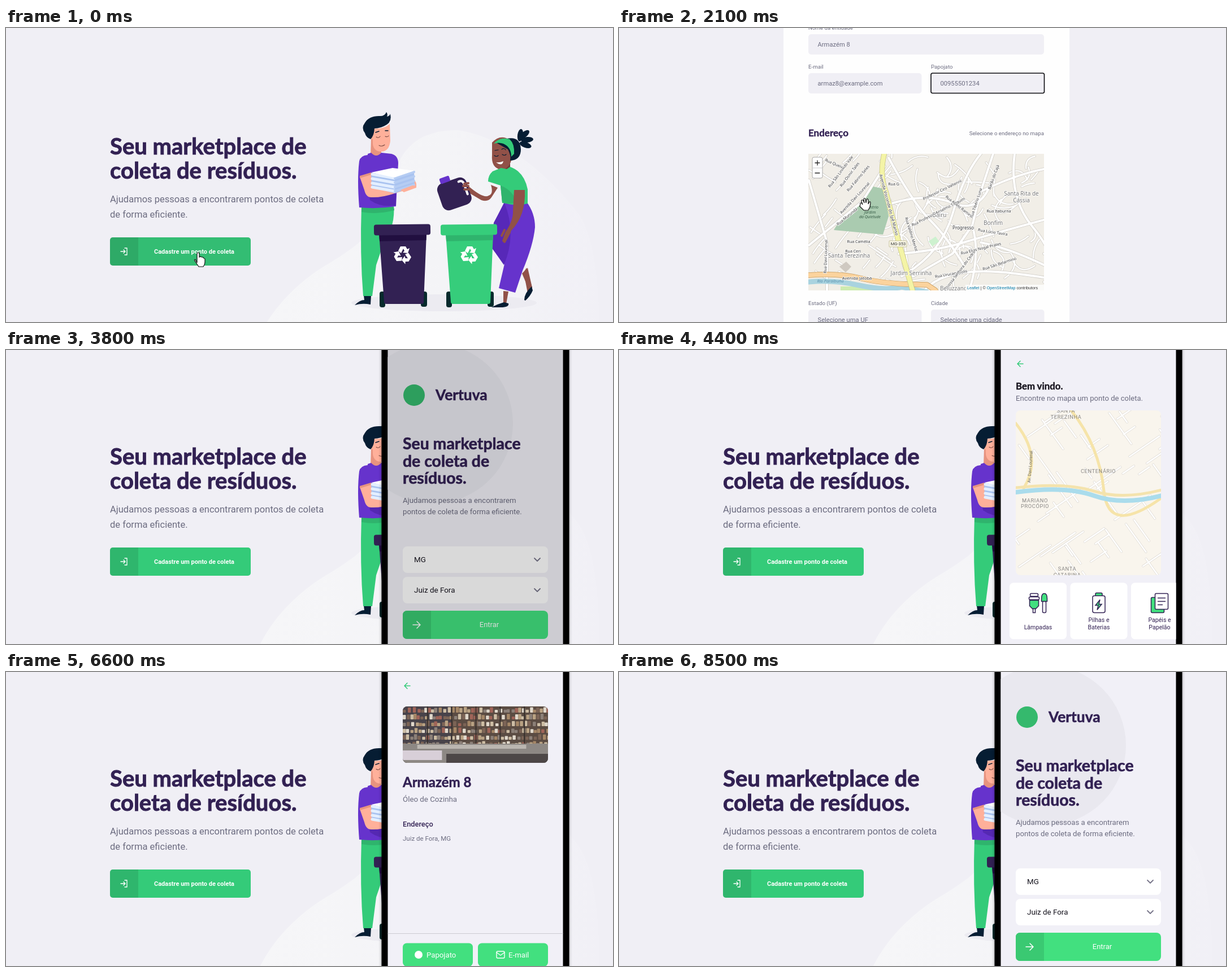
An HTML page that plays this animation: 1074x521 px, repeating every 8.6 s.

```html
<!DOCTYPE html>
<html lang="pt-BR">
<head>
<meta charset="utf-8">
<title>Coleta de resíduos</title>
<style>
  html, body { margin: 0; width: 100%; height: 100%; overflow: hidden; background: #f0eff5; }
  svg { display: block; }
  text { font-family: Roboto, sans-serif; white-space: pre; }
  .title { font-family: Lato, sans-serif; font-weight: 700; stroke-width: .022em; }
  .place { font-family: "Noto Sans", sans-serif; }
  .credit { font-family: "Liberation Sans", sans-serif; }
  #phone { filter: drop-shadow(0 0 2.5px rgba(0, 0, 0, .4)); }
</style>
</head>
<body>
<svg id="stage" width="1074" height="521" viewBox="0 0 1074 521"></svg>
<script>
const INK = '#322153', GRAY = '#6c6c80', GREEN = '#34cb79', MINT = '#42e07f', PURPLE = '#6633cc';
const NAVY = '#061d33', SKIN = '#ffb09a', BROWN = '#915148', PAGE = '#f0eff5';

let clipCount = 0;
const text = (x, y, size, s, fill = GRAY, attrs = '') =>
  `<text x="${x}" y="${y}" font-size="${size}" fill="${fill}" ${attrs}>${s}</text>`;
const title = (x, y, size, s, fill = INK) => text(x, y, size, s, fill, `class="title" stroke="${fill}"`);
const mid = 'text-anchor="middle"';
const inked = `stroke="${INK}" stroke-width="1.5"`;
const rect = (x, y, w, h, r, fill, attrs = '') =>
  `<rect x="${x}" y="${y}" width="${w}" height="${h}" rx="${r}" fill="${fill}" ${attrs}/>`;
const path = (d, fill, attrs = '') => `<path d="${d}" fill="${fill}" ${attrs}/>`;
const line = (d, stroke, w = 1, attrs = '') =>
  `<path d="${d}" fill="none" stroke="${stroke}" stroke-width="${w}" stroke-linecap="round" stroke-linejoin="round" ${attrs}/>`;
const circle = (x, y, r, fill) => `<circle cx="${x}" cy="${y}" r="${r}" fill="${fill}"/>`;
const group = (id, body) => `<g id="${id}">${body}</g>`;
const at = (x, y, body, extra = '') => `<g transform="translate(${x} ${y}) ${extra}">${body}</g>`;
const clip = (x, y, w, h, r, body) => {
  const id = 'clip' + ++clipCount;
  return `<clipPath id="${id}">${rect(x, y, w, h, r, '#000')}</clipPath><g clip-path="url(#${id})">${body}</g>`;
};
const random = seed => () => (seed = (seed * 16807) % 2147483647) / 2147483647;

// Pictures in flat tones
function shelves(x, y, w, h, r, seed) {
  const next = random(seed), unit = h / 100;
  const tones = ['#a58767', '#cdbda4', '#7c6456', '#e0d8cb', '#8c8078', '#a06458', '#b9a283'];
  let body = rect(x, y, w, h, 0, '#5b4c43') + rect(x, y, w * .34, h, 0, '#48434a');
  for (let row = 0; row < 6; row++)
    for (let px = 0; px < w; px += (5 + next() * 4) * unit) {
      const tall = (5 + next() * 5) * unit;
      body += rect(x + px, y + (row * 12 + 11) * unit - tall, 5.5 * unit, tall, unit, tones[next() * tones.length | 0]);
    }
  for (let i = 1; i < 6; i++) body += rect(x + w * i / 6, y, 2 * unit, h * .68, 0, '#37302d');
  body += rect(x, y + h * .66, w, h * .34, 0, '#8d8884') + rect(x + w * .1, y + h * .68, w * .75, h * .07, 0, '#bbb6b0')
    + rect(x, y + h * .78, w * .27, h * .17, 0, '#d8cfd8') + rect(x + w * .3, y + h * .84, w * .7, h * .16, 0, '#4d4747');
  return clip(x, y, w, h, r, body);
}
const aisle = (x, y, w, h, tone) => clip(x, y, w, h, 0, rect(x, y, w, h, 0, '#35302f')
  + path(`M${x} ${y + h}L${x + w * .45} ${y + h * .5}h${w * .12}L${x + w} ${y + h}Z`, '#9b9a9a')
  + path(`M${x + w} ${y}v${h * .9}L${x + w * .57} ${y + h * .5}ZM${x} ${y}v${h * .9}L${x + w * .45} ${y + h * .5}Z`, tone)
  + line(`M${x + w * .25} ${y}L${x + w * .47} ${y + h * .42}M${x + w * .75} ${y}L${x + w * .55} ${y + h * .42}`, '#e6e2da', 1.5));

const hand = (x, y) => at(x, y, path('M-3 9V-7q0-2 2-2t2 2v6l2-1 2 1 2 0 2 2q2 0 2 2v5q0 4-3 8H0L-6 7q-3-4 0-4Z', '#fff', 'stroke="#111" stroke-width="1.2"'));
const arrow = (x, y) => at(x, y, path('M0 0V16L4 12.5 7 19 10 17.5 7 11.5H12Z', '#fff', 'stroke="#222"'));
const grab = (x, y) => at(x, y, path('M-8 1q-1-4 2-3l2 3-2-6q0-3 3-2l2 5-1-7q1-3 3 0l1 7 1-6q2-3 3 1v7l2-4q2-1 2 2l-1 7-3 6h-8L-9 4Z', '#fff', 'stroke="#111" stroke-width="1.2"'));

// Landing page
const recycle = (x, y) => at(x, y, [0, 120, 240].map(a =>
  path('M-8-7L-4-15H5L8-10 12-12 9-3 0-4 3-7 1-11-3-3Z', '#fff', `transform="rotate(${a})"`)).join(''));
const bin = (x, body, shade) => at(x, 0,
  rect(10, 467, 10, 28, 4, '#062a2c') + rect(83, 467, 11, 27, 4, '#062a2c')
  + path('M9 364L93 363 88 486q0 3-4 3H22q-4 0-4-4Z', body) + path('M9 364H93L92.5 376 10 378Z', shade)
  + rect(0, 348, 100, 19, 4, body, 'transform="rotate(-.7 50 357)"') + recycle(51, 402));

const man = path('M633 474h13l-1 16q-14-3-28 1 9-9 17-9Z', NAVY)
  + path('M629 314H686Q689 350 670 376L655 420 648 475H632Q626 400 629 314Z', GREEN)
  + path('M629 317h57l1 6q-30 8-58 3Z', '#2fb46d')
  + path('M646 196h18v30q-9 7-19 0Z', '#e7937f')
  + path('M640 223l6-2q9 10 18 0l18 2q12 3 12 17l-4 76q-33 5-65 2-4-50 0-82 2-10 15-11Z', PURPLE)
  + path('M640 280h50v34q-26 5-46-9Z', '#5528b2')
  + path('M648 178q20 2 31-8l1 30q-2 19-16 19-13 0-15-13Z', SKIN) + circle(649, 193, 4, SKIN)
  + path('M645 197q-8-3-10-11-7-9 0-18 7-12 25-12 10 1 13-7 3 4 1 8 5-1 6-5 3 13-6 19-11 7-22 7-1 10-3 13-1 3-4 6Z', NAVY)
  + line('M655 193q4 3 7-1m9 0q4 2 6-1M660 208q5 3 10-1', '#76463f', 1.1) + line('M654 185l6-2m11-1 5 0', NAVY, 1.5)
  + path('M626 264l20-6 5 26 40 1 32-15q4 4 3 12l-38 11q-24 8-42 7-9 0-12-13Z', SKIN)
  + path('M626 262l20-6v4l-20 6Z', '#e7937f')
  + path('M646 257L687 264 722 254 723 280 688 293 647 282Z', '#a9c3f0')
  + [0, 8, 16, 23].map(y => line(`M648 ${259 + y}l39 7`, '#e4efff', 5) + line(`M688 ${266 + y}l34-11`, '#b6cdf3', 4)).join('')
  + path('M646 256l38-8 38 5-35 12Z', '#fff') + path('M698 287l21-8q8 0 7 4l-22 8Z', SKIN);

const petals = [[917, 189, 50], [922, 198, 85], [910, 190, 8], [919, 207, 110]].map(([x, y, a]) =>
  `<ellipse cx="${x}" cy="${y}" rx="5" ry="11" fill="${NAVY}" transform="rotate(${a} ${x} ${y})"/>`).join('');
const woman = petals
  + path('M889 467l-4 22-5 1 0-24ZM921 425l10 35-7 15-8-42Z', BROWN) + path('M913 435l10-10 8 35-6 3Z', BROWN)
  + path('M881 486l8 2q2 7-14 7h-16q11-6 22-9ZM917 482q0-12 13-24l2 7q-4 10-13 18Z', NAVY)
  + path('M882 308h39q15 20 15 45-3 32-22 77L901 469 872 461 882 418 858 388 863 346Z', PURPLE)
  + path('M882 310q22 55-1 110l-21-30 3-45Z', '#5728b8')
  + path('M858 278q5 16-4 19-9 6-36-17-7-4-10 1l1 7 10 4 22 13q12 4 18-5l11-17Z', BROWN)
  + path('M871 240h21v14q-12 6-21-4Z', '#733d38')
  + path('M860 203q15-16 32-4 8 8 4 29-5 23-20 23-18-3-16-26Z', BROWN)
  + path('M886 196q24-5 25 19 0 19-19 20 2-9-4-20l-21-12q4-8 19-7Z', NAVY)
  + path('M867 201q10-8 24-4 9 8 8 26l-5 5q0-17-14-23-8-3-17 0Z', GREEN)
  + path('M867 238q6 1 13-2-2 10-13 2Z', '#fff') + line('M864 226q4 3 7 0m7-2q4 3 7 0M865 217l6-1m6-1q5-3 7 1', NAVY, 1.2)
  + path('M861 254l15-6 10 2 6-4q25 9 31 40v25q-20 6-45-2l-3-30-22-7q0-11 8-18Z', GREEN)
  + path('M875 279q24 10 28 31-12 2-25 0Z', '#2fb46d')
  + path('M899 287h19q2 45-24 72l-8 16q-6 8-8 2l5-14q15-22 14-39Z', BROWN) + line('M882 358l-5 10m10-8-6 17m10-15-9 17', BROWN, 4)
  + at(793, 293, rect(-27, -24, 54, 50, 12, INK) + rect(-17, -33, 18, 10, 2, PURPLE)
    + line('M14-17q7-1 8 6V9', '#fff', 4), 'rotate(-19)')
  + line('M811 276l7-1m-9 5h9m-7 6h9', BROWN, 4);

const landing = `<linearGradient id="haze"><stop stop-color="#f6f6f8"/><stop offset=".55" stop-color="#f4f4f7"/><stop offset="1" stop-color="#f1f0f6"/></linearGradient>`
  + path('M446 550C468 502 508 457 560 424 600 400 640 375 656 342 676 300 675 265 694 240Q720 180 800 181 850 188 905 225T1010 325Q1050 375 1050 550Z', 'url(#haze)')
  + `<ellipse cx="775" cy="487" rx="164" ry="15" fill="#ecebf1"/>`
  + man + woman + bin(651, INK, '#210f40') + bin(769, '#36cd7b', '#2fb46d')
  + title(184, 224, 40, 'Seu marketplace de') + title(184, 267, 40, 'coleta de resíduos.')
  + text(184, 309, 16.55, 'Ajudamos pessoas a encontrarem pontos de coleta') + text(184, 335.5, 16.55, 'de forma eficiente.')
  + rect(184, 371, 249, 50, 5, GREEN, 'id="cta"') + path('M234 371v50h-45q-5 0-5-5v-40q0-5 5-5Z', 'rgba(0,0,0,.1)')
  + line('M203 396h8m-3-3 3 3-3 3m2-9h4v12h-4', '#fff', 1.3) + text(333, 399.5, 11, 'Cadastre um ponto de coleta', '#fff', `${mid} font-weight="700"`);

// City map
function cityMap() {
  const next = random(77);
  let minor = '';
  for (let i = 0; i < 110; i++) {
    const x = 336 + next() * 416, y = 223 + next() * 225, a = (x < 470 ? -.9 : next() * 3) + (i % 3 ? 0 : 1.5), len = 16 + next() * 36;
    const dx = Math.cos(a) * len, dy = Math.sin(a) * len, bend = (next() - .5) * (x < 470 ? .2 : 1.2);
    minor += `M${x} ${y}q${dx / 2 - dy * bend} ${dy / 2 + dx * bend} ${dx} ${dy}`;
  }
  const major = 'M336 385L430 308 470 245M336 270L368 380V465M477 230Q520 310 550 340T610 420M495 400Q560 395 610 380T752 340M500 440Q570 400 590 330T640 223M520 440L590 400 625 350 640 290 662 223M620 465Q640 400 625 350M640 290Q700 260 752 250M470 315Q540 290 590 310T660 270M700 223Q690 300 730 350T752 400M540 465Q580 420 700 435T752 450M640 380Q690 390 752 420';
  const river = 'M336 450Q380 446 425 456T500 459L545 468', avenue = 'M336 438Q390 434 430 444T545 455L560 465', highway = 'M470 220Q460 260 472 290L495 380 520 467';
  const road = (d, w, fill, edge) => line(d, edge, w + 1.5) + line(d, fill, w);
  const label = ([s, x, y, a = 0, size = 7]) => text(x, y, size, s, size > 8 ? '#777' : '#333',
    `class="place" ${mid} transform="rotate(${a} ${x} ${y})" stroke="#fff" stroke-width="1.6" paint-order="stroke"`);
  const names = [
    ['Avenida Visconde do Ipê Manso', 475, 314, 75, 7.5], ['Avenida Jatobá', 421, 446, 0, 7.5], ['Rua Camélia', 424, 381],
    ['Rua Murundá', 405, 336, -39], ['Rua Ceri', 414, 398], ['Rua Davi Lourenal', 368, 405, -88], ['Avenida Davi Lourenal', 419, 303, -47],
    ['Rua Professor Anselmo Tarquim', 566, 328, -27], ['Professor Ciro Valtenni', 573, 289, -26], ['Rua Itaburna', 672, 327],
    ['Rua Elias Nogal Prates', 641, 393, -14], ['Rua São Belarmino', 674, 420, -18], ['Rua Valdino Merlot', 515, 366, 73],
    ['Rua Urucanópolis', 588, 438, -10], ['Rua Nossa Senhora do Cedro', 602, 435, -53], ['Rua Tibério Luna', 634, 311, -72],
    ['Rua Lúcio Tavira', 661, 364, 9], ['Barão do Cajá', 665, 265, -70], ['Rua Osmir Tales', 410, 261, -53], ['Rua Fabrino Seles', 425, 268, -50],
    ['Rua São Lino do Vale', 394, 256, -53], ['Rua Queiva', 381, 243, 24], ['Rua Abelo Ramiro', 600, 318, 38], ['Rua G', 486, 279], ['Progresso', 609, 357, 0, 8],
    ['Bairu', 567, 335, 0, 10], ['Bonfim', 662, 349, 0, 10], ['Santa Rita de', 712, 297, 0, 10], ['Cássia', 712, 309, 0, 10],
    ['Santa Terezinha', 407, 407, 0, 10], ['Jardim Serrinha', 517, 438, 0, 10], ['Beluzzano', 592, 465, 0, 10]];
  return clip(335, 223, 417, 242, 0, rect(335, 223, 417, 242, 0, '#f1eee7')
    + road(minor, 2.4, '#fff', '#d0cdc7') + road(major, 4, '#fff', '#cfccc6')
    + path('M450 281L469 285 477 334 467 366 380 358 385 350 432 309Z', '#aacbb0') + rect(550, 373, 15, 11, 0, '#cdf1cf', 'transform="rotate(-35 557 379)"')
    + path('M390 423l12-9 9 9-10 10Z', '#cfc9c1') + rect(392, 458, 58, 8, 0, '#cdebb0')
    + line(river, '#a9d3df', 9) + road(avenue, 8, '#fbd39d', '#c69a5b') + road(highway, 8, '#f4f4a6', '#c6c483')
    + ['Cemitério', 'Jardim', 'da Quietude'].map((s, i) => text(444, 320 + i * 8.5, 7, s, '#365b45', `${mid} font-style="italic" class="place"`)).join('')
    + names.map(label).join('') + text(374, 451, 7.5, 'Rio Paraibuna', '#5b91ae', `${mid} font-style="italic" class="place"`)
    + rect(478, 377, 31, 11, 1, '#f8f6e6', 'stroke="#b5af80" stroke-width=".7"') + text(494, 385, 7.5, 'MG-353', '#333', mid)
    + rect(342, 229, 18, 37, 3, '#fff', 'stroke="#aaa"') + line('M347 239h8m-4-4v8M347 257h8', '#222', 1.3) + line('M342 248h18', '#ccc')
    + rect(613, 455, 139, 10, 0, 'rgba(255,255,255,.75)')
    + text(616, 462.5, 7.2, '<tspan fill="#0078a8">Leaflet</tspan> | © <tspan fill="#0078a8">OpenStreetMap</tspan> contributors', '#333', 'class="credit"'));
}

// Collection items
const ICONS = {
  bulb: rect(-14, -17, 14, 5, 2, '#fff', inked) + rect(-16, -11, 18, 5, 2, '#fff', inked)
    + path('M-15-5H1V5L-4 10h-6L-15 5Z', MINT, inked) + rect(-9, 10, 4, 7, 0, '#fff', inked)
    + path('M6-8q0-9 5-9t5 9v5H6Z', MINT, inked) + rect(8, -3, 6, 20, 2, '#fff', inked),
  battery: rect(-6, -18, 12, 6, 2, MINT, inked) + rect(-11, -13, 22, 30, 3, '#fff', inked) + path('M2-6L-6 4h5l-2 8 8-10H0Z', MINT, inked),
  paper: rect(-15, -10, 23, 27, 2, MINT, inked) + rect(-8, -17, 23, 28, 2, '#fff', inked) + line('M-3-9h13m-13 6h13m-13 6h8', INK, 1.4),
  laptop: rect(-15, -13, 30, 21, 2, '#fff', inked) + rect(-19, 9, 38, 5, 2, MINT, inked),
  leaf: path('M-13 13Q-16-12 14-16 17 13-13 13Z', MINT, inked) + line('M-14 16L7-7', INK, 1.5),
  oil: path('M-4-17h8v9l6 7v15q0 3-3 3H-7q-3 0-3-3V-1l6-7Z', '#fff', inked) + rect(-9, 3, 18, 10, 0, MINT)
};
const ITEMS = [['bulb', 'Lâmpadas'], ['battery', 'Pilhas e', 'Baterias'], ['paper', 'Papéis e', 'Papelão'],
  ['laptop', 'Resíduos', 'Eletrônicos'], ['leaf', 'Resíduos', 'Orgânicos'], ['oil', 'Óleo de', 'Cozinha']];
const item = (x, y, w, h, fill, [icon, ...lines], cls = '') => rect(x, y, w, h, 7, fill)
  + (cls && rect(x + 1, y + 1, w - 2, h - 2, 6, 'none', `stroke="${MINT}" stroke-width="2" class="${cls}"`))
  + at(x + w / 2, y + h * .36, ICONS[icon])
  + lines.map((s, i) => text(x + w / 2, y + h - 18 - (lines.length - 1 - i) * 13, 10.6, s, INK, mid)).join('');

// Registration form
const field = (x, y, w, label, id, value) => text(x, y - 8, 9.7, label) + rect(x, y, w, 36, 5, PAGE) + text(x + 16.5, y + 21.5, 11.2, value, GRAY, `id="${id}"`);
const form = rect(291, 0, 506, 1600, 0, '#fefefe')
  + title(335, 53, 27, 'Cadastro do') + title(335, 82, 27, 'ponto de coleta')
  + rect(335, 121, 417, 208, 7, '#e1faec') + rect(357, 142, 374, 166, 7, 'none', 'stroke="#4ecb79" stroke-dasharray="3 2"')
  + line('M538 217v5h12v-5M544 218v-9m-4 4 4-4 4 4', GREEN, 1.5) + text(544, 240, 11.05, 'Imagem do estabelecimento', INK, mid)
  + group('upload', shelves(335, 121, 417, 208, 7, 41))
  + title(335, 388, 17, 'Dados') + field(335, 437, 417, 'Nome da entidade', 'name', 'Armazém 8')
  + field(335, 506, 200.5, 'E-mail', 'mail', 'armaz8@example.com') + field(552, 506, 200.5, 'Papojato', 'number', '00955501234')
  + rect(552, 506, 200.5, 35.5, 3, 'none', 'id="focus" stroke="#0b0b0f" stroke-width="1.6"')
  + title(335, 617.5, 17, 'Endereço') + text(752, 615.5, 9.7, 'Selecione o endereço no mapa', GRAY, 'text-anchor="end"')
  + at(0, 426, cityMap())
  + field(335, 925, 200.5, 'Estado (UF)', 'state', 'Selecione uma UF') + field(552, 925, 200.5, 'Cidade', 'city', 'Selecione uma cidade')
  + title(335, 1037, 17, 'Ítens de coleta') + text(752, 1035, 9.7, 'Selecione um ou mais ítens abaixo', GRAY, 'text-anchor="end"')
  + ITEMS.map((it, i) => item(335 + i % 3 * 143, 1070 + (i / 3 | 0) * 135, 131, 124, PAGE, it, i === 5 ? 'picked' : '')).join('')
  + rect(572, 1377, 180, 38, 5, GREEN) + text(662, 1400, 11, 'Cadastrar ponto de coleta', '#fff', `${mid} font-weight="700"`);

// File picker
const fileName = (x, y, s) => text(x, y, 7.6, s, '#333', `${mid} class="place"`);
const folder = x => path(`M${x - 20}-12h28l4 34h-27Z`, '#f3d98b') + path(`M${x - 7}-12h20v28l-16 7Z`, '#fdf8e9');
const dialog = rect(-20, -30, 391, 239, 0, '#f0f0f0', 'stroke="#888" stroke-width=".8" style="filter:drop-shadow(0 3px 5px rgba(0,0,0,.4))"')
  + rect(0, -10, 366, 167, 0, '#fff') + folder(49) + folder(120) + rect(85, 39, 71, 62, 0, '#cfd3d8')
  + aisle(167, -20, 49, 44, '#4b5357') + aisle(232, -20, 61, 44, '#7a5436') + aisle(303, -20, 61, 44, '#a56c33')
  + aisle(18, 41, 61, 46, '#39444b') + shelves(89, 47, 62, 40, 0, 41)
  + ['assets', 'pages', 'market1', 'market2', 'market3'].map((s, i) => fileName(49 + i * 71.3, 34, s)).join('')
  + fileName(49, 97, 'market4') + fileName(121, 97, 'market5') + fileName(3, 174, 'me:')
  + rect(12, 163, 212, 16, 0, '#fff', 'stroke="#999"') + rect(14, 166, 31, 10, 0, '#0078d7') + text(15, 174, 7.6, 'market5', '#fff', 'class="place"')
  + rect(233, 163, 125, 16, 0, '#e5e5e5', 'stroke="#aaa"') + text(236, 174, 7.7, 'Arquivos de imagem', '#333', 'class="place"')
  + line('M216 170l2.5 2.5 2.5-2.5M350 170l2.5 2.5 2.5-2.5', '#444')
  + rect(233, 183, 58, 16, 0, '#d5e6f3', 'stroke="#0078d7"') + rect(300, 183, 58, 16, 0, '#e1e1e1', 'stroke="#aaa"') + fileName(262, 194, 'Abrir') + fileName(329, 194, 'Cancelar');

// Phone screens
const screen = (id, body) => group(id, rect(675, 0, 311, 521, 0, '#f1f0f7') + body);
const back = line('M715 24.5h-10m5-5-5 5 5 5', GREEN, 1.5);
const picker = (y, s) => rect(702, y, 257, 47, 8, '#fff') + text(722, y + 28, 13.4, s, '#15131d') + line(`M935 ${y + 21}l5 5 5-5`, '#77758a', 1.8);
const home = circle(755, 130, 142, '#e9e8ef') + circle(722, 80, 19, '#35b96d')
  + title(760, 89, 26.3, 'Vertuva') + title(702, 176, 28.4, 'Seu marketplace') + title(702, 206.5, 28.4, 'de coleta de') + title(702, 237, 28.4, 'resíduos.')
  + text(702, 271, 13.2, 'Ajudamos pessoas a encontrarem') + text(702, 291, 13.2, 'pontos de coleta de forma eficiente.')
  + picker(348, 'MG') + picker(402, 'Juiz de Fora')
  + rect(702, 462, 257, 50, 8, MINT) + path('M752 462v50h-42q-8 0-8-8v-34q0-8 8-8Z', '#3ac972')
  + line('M720 487h13m-6-6 6 6-6 6', '#fff', 1.5) + text(855, 491, 13, 'Entrar', '#fff', mid)
  + rect(675, 0, 311, 521, 0, 'rgba(0,0,0,.15)', 'id="dim"');

const marker = (x, y, s, photo) => clip(x, y, 75, 58, 6, photo + rect(x, y + 38, 75, 20, 0, MINT) + text(x + 37.5, y + 51, 10.8, s, '#fff', mid));
function phoneMap() {
  const next = random(19);
  let streets = '';
  for (let i = 0; i < 55; i++) {
    const a = i % 2 ? -.6 : .95, len = 20 + next() * 60;
    streets += `M${690 + next() * 270} ${107 + next() * 290}l${Math.cos(a) * len} ${Math.sin(a) * len}`;
  }
  const names = [['SANTA', 791, 111], ['TEREZINHA', 791, 122], ['CENTENÁRIO', 848, 218], ['MARIANO', 736, 270], ['PROCÓPIO', 736, 280], ['SANTA', 793, 391], ['CATARINA', 793, 402]];
  return clip(702, 107, 257, 292, 8, rect(702, 107, 257, 292, 0, '#f9f5ed') + line(streets, '#dedad4', 4) + line(streets, '#fff', 2.6)
    + line('M800 107Q850 170 858 250T960 262M702 130Q750 190 716 245', '#f6e4a9', 5) + line('M702 252Q790 240 840 258T960 258', '#aadcec', 8) + line('M702 244Q790 234 840 250T960 248', '#f4e3ad', 5)
    + names.map(([s, x, y]) => text(x, y, 9.3, s, '#898785', `${mid} letter-spacing=".6"`)).join('')
    + text(730, 207, 7.5, 'Av. Davi Lourenal', '#666', `${mid} transform="rotate(-86 730 207)"`)
    + group('markers', marker(836, 344, 'Armazém 5', aisle(836, 344, 75, 38, '#7c624c')) + marker(831, 326, 'Armazém 4', aisle(831, 326, 75, 38, '#4c5864'))
      + marker(808, 267.5, 'Armazém  3', aisle(808, 267, 75, 39, '#826345')) + marker(751, 166, 'Armazém 8', shelves(751, 166, 75, 38, 0, 41))));
}
const points = back + title(702, 70, 16.8, 'Bem vindo.', '#18151f') + text(702, 90, 13.1, 'Encontre no mapa um ponto de coleta.')
  + phoneMap() + ITEMS.slice(0, 3).map((it, i) => item(691 + i * 107.5, 412.5, 101, 100, '#fff', it, i < 2 ? 'chosen' : '')).join('');

const detail = group('info', back + shelves(702, 61, 257, 100, 8, 41)
  + title(702, 203.5, 24, 'Armazém 8') + text(702, 230, 13.3, 'Óleo de Cozinha') + text(702, 274, 12.8, 'Endereço', INK, 'font-weight="500"') + text(702, 298.5, 11.5, 'Juiz de Fora, MG')
  + rect(675, 463, 311, 1, 0, '#cbcad1') + rect(702, 480.5, 124, 41, 7, MINT) + rect(835, 480.5, 124, 41, 7, MINT)
  + circle(730, 501, 7, '#fff') + text(744, 505.5, 13.2, 'Papojato', '#fff') + rect(868, 495, 14, 12, 2, 'none', 'stroke="#fff" stroke-width="1.4"')
  + line('M868 497l7 5 7-5', '#fff', 1.3) + text(889, 505.5, 13.2, 'E-mail', '#fff'));

stage.innerHTML = rect(0, 0, 1074, 521, 0, PAGE) + group('landing', landing) + group('form', form) + group('dialog', dialog)
  + group('hand', hand(341, 407)) + group('arrow', arrow(308, 217)) + group('grab', grab(435, 312))
  + group('phone', rect(664.5, -20, 332, 561, 0, '#000') + clip(675.5, 0, 310, 521, 0, screen('home', home) + screen('points', points) + screen('detail', detail)));

const el = id => document.getElementById(id);
const show = (id, on) => el(id).style.display = on ? '' : 'none';
const showAll = (selector, on) => document.querySelectorAll(selector).forEach(e => e.style.display = on ? '' : 'none');
const move = (id, x, y) => el(id).setAttribute('transform', `translate(${x} ${y})`);
const stepAt = (n, steps) => steps.reduce((value, [from, v]) => n >= from ? v : value, 0);

// A pushed screen enters from the right while the one below drifts left.
function place(id, depth, current) {
  const offset = depth - current;
  show(id, Math.abs(offset) < 1);
  move(id, 310 * offset * (offset <= 0 ? .3 : 1), 0);
}

// n counts tenths of a second.
function render(n) {
  const onForm = n >= 5 && n < 36, phoneTime = n >= 36;
  show('landing', !onForm);
  move('landing', 0, phoneTime ? -21 : 0);
  el('cta').setAttribute('fill', phoneTime ? GREEN : '#33bd73');
  show('hand', n < 5);

  show('form', onForm);
  move('form', 0, -stepAt(n, [[14, 210], [21, 426], [26, 620], [31, 960]]));
  show('upload', n >= 13);
  show('name', n >= 15);
  show('mail', n >= 16);
  show('number', n >= 21);
  show('focus', n >= 21 && n < 26);
  el('state').textContent = n >= 26 ? 'MG' : 'Selecione uma UF';
  el('city').textContent = n >= 26 ? 'Juiz de Fora' : 'Selecione uma cidade';
  showAll('.picked', n >= 31);
  el('dialog').style.opacity = stepAt(n, [[7, .45], [8, 1], [10, .45], [11, 0]]);
  show('arrow', n >= 7 && n < 13);
  show('grab', n >= 21 && n < 26);

  show('phone', phoneTime);
  const current = stepAt(n, [[42, .3], [43, .75], [44, 1], [56, 1.49], [57, 2], [76, 1], [81, .7], [82, .35], [83, .1], [84, 0]]);
  ['home', 'points', 'detail'].forEach((id, depth) => place(id, depth, current));
  show('dim', n < 39);
  show('info', n > 56);
  show('markers', n >= 51);
  showAll('.chosen', n >= 51);
}

const start = performance.now();
let shown = -1;
function tick() {
  const n = Math.floor((performance.now() - start) % 8600 / 100);
  if (n !== shown) render(shown = n);
  requestAnimationFrame(tick);
}
tick();
</script>
</body>
</html>
```
